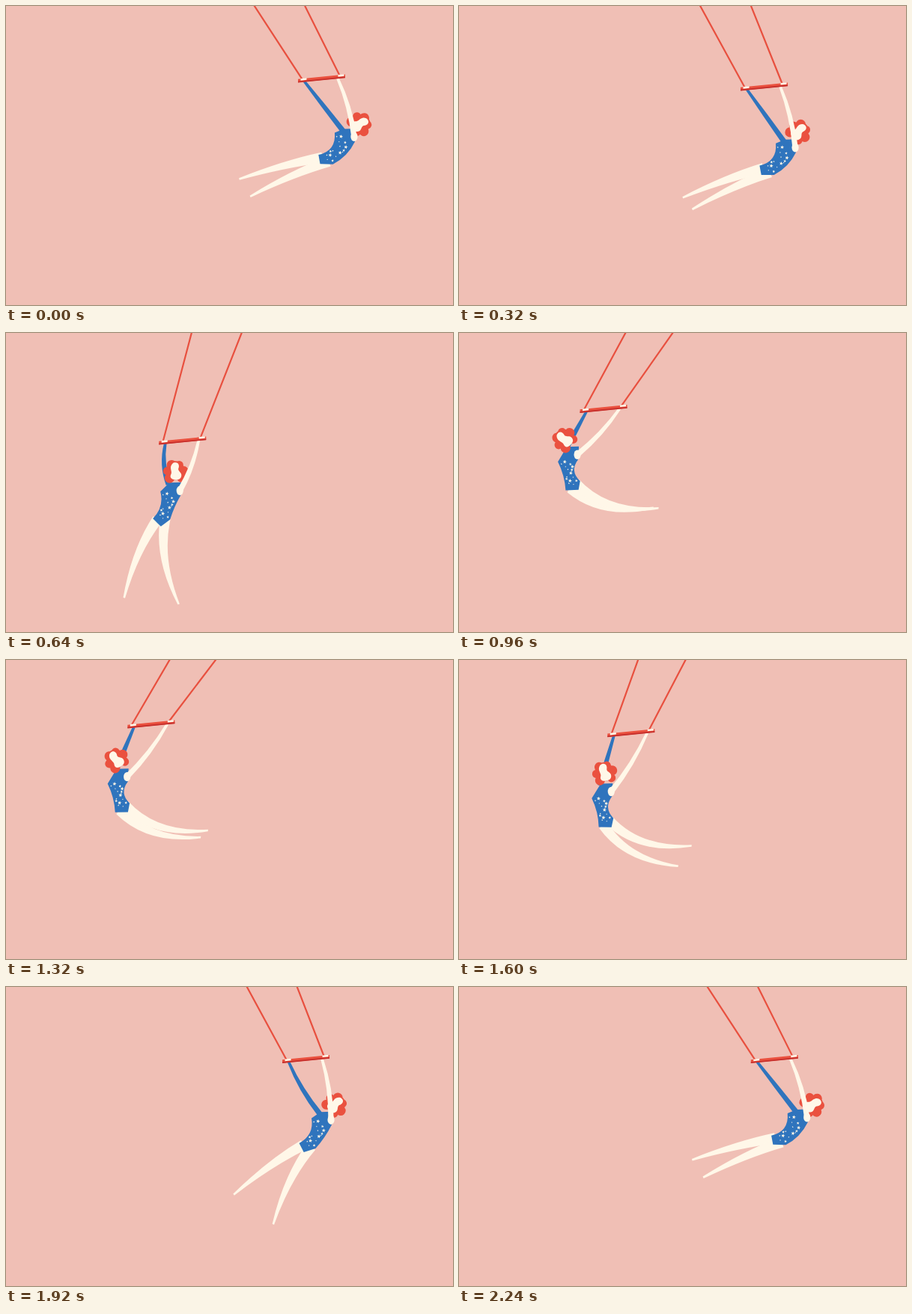
Animation of 597 by 400 pixels, one loop 2.28 s. Source, as an HTML page:

```html
<!DOCTYPE html>
<html lang="en">
<head>
<meta charset="utf-8">
<title>Trapeze</title>
<style>
  html, body { margin: 0; width: 100%; height: 100%; overflow: hidden; background: #f0bfb5; }
  svg { display: block; width: 597px; height: 400px; }
</style>
</head>
<body>
<svg viewBox="0 0 597 400">
  <path id="ropes" stroke="#e8503f" stroke-width="2.2"/>
  <path id="armL" fill="#2f74bd"/>
  <g fill="#fff7e8"><path id="legL"/><path id="legR"/></g>
  <path id="torso" fill="#2f74bd"/>
  <path id="stars" fill="#fff7e8"/>
  <g id="head">
    <path id="hair" fill="#ea513f"/>
    <path fill="#fff7e8" d="M-1-12C4-13 6-8 4-4C3 0 9 1 8 6C7 11 3 11 0 11C-5 11-8 8-6 4C-4 1-7-3-6-7C-5-10-3-12-1-12Z"/>
  </g>
  <path id="armR" fill="#fff7e8"/>
  <ellipse id="shoulder" rx="4.6" ry="6.2" fill="#fff7e8"/>
  <g id="bar">
    <path fill="#ea513f" d="M-31.5 1L31.5-5.3V-.8L-31.5 5.5Z"/>
    <path fill="#c8312d" d="M-31.5 3.8L31.5-2.5V-.6L-31.5 5.7Z"/>
    <path fill="#fff7e8" d="M-28 .3L-20-.6V2L-28 3ZM22-4.8L30-5.6V-3L22-2.2Z"/>
  </g>
</svg>
<script>
const LOOP = 2280, STEP = 40;
const PIVOT = { x: 298.5, y: -93 };
const LEG = 115, SPINE = 52;
const $ = id => document.getElementById(id);
const set = (id, d) => $(id).setAttribute('d', d);

// Key poses: time, rope reach, collar x and y from the bar, back arch (-1 to 1),
// head tilt, and the directions of both legs in degrees.
const poses = [
  [-20, 226, 37.5, 67.5, 1, 65, 165.5, 156],
  [320, 228.5, 35.5, 71, 1, 45, 160, 154.5],
  [640, 245, -9.5, 56.5, .1, 0, 113, 81],
  [960, 221, -41, 51, -1, -48, 13.5, 16.5],
  [1600, 202.5, -32.5, 68, -.95, -12, 29, 17],
  [1920, 215, 27.5, 71, .55, 50, 144.5, 116]
];

// Periodic monotone cubic through the key poses.
function poseAt(t) {
  const n = poses.length;
  const key = j => poses[(j + n) % n];
  const time = j => key(j)[0] + Math.floor(j / n) * LOOP;
  if (t >= time(n)) t -= LOOP;
  let i = n - 1;
  while (i > 0 && time(i) > t) i--;
  const span = time(i + 1) - time(i), u = (t - time(i)) / span, w = 1 - u;
  return poses[0].map((_, col) => {
    const val = j => key(j)[col];
    const slope = j => (val(j + 1) - val(j)) / (time(j + 1) - time(j));
    const tangent = j => {
      const a = slope(j - 1), b = slope(j);
      return a * b > 0 ? 2 * a * b / (a + b) : 0;
    };
    return val(i) * w * w * (1 + 2 * u) + val(i + 1) * u * u * (3 - 2 * u)
      + span * u * w * (tangent(i) * w - tangent(i + 1) * u);
  });
}

// Sharpened cosine: 1 at the right end, -1 at the left end.
function swing(t) {
  const turn = (start, length) => Math.PI * Math.min(1, Math.max(0, (t - start) / length));
  const c = t < 1100 ? Math.cos(turn(0, 1060)) : -Math.cos(turn(1165, 1135));
  return Math.tanh(2.2 * c) / Math.tanh(2.2);
}

const mix = (a, b, k) => a.map((v, i) => v + (b[i] - v) * k);
const add = (p, x, y) => [p[0] + x, p[1] + y];
const polar = (p, deg, r) => add(p, r * Math.cos(deg * Math.PI / 180), r * Math.sin(deg * Math.PI / 180));
const heading = (a, b) => Math.atan2(b[1] - a[1], b[0] - a[0]) * 180 / Math.PI;
const str = p => p.map(v => v.toFixed(2)).join(' ');

// Point beside the line a-b, bow px to its right-hand side.
const beside = (a, b, bow, k = .5) => polar(mix(a, b, k), heading(a, b) + 90, bow);
// Quadratic from a to b that passes through m halfway.
const via = (a, m, b) => `Q${str(m.map((v, i) => 2 * v - (a[i] + b[i]) / 2))} ${str(b)}`;

// Curved limb with half-widths at root, middle and end.
function limb(root, end, bow, widths, k = .5) {
  const mid = beside(root, end, bow, k);
  const dirs = [heading(root, mid), heading(root, end), heading(mid, end)];
  const edge = side => [root, mid, end].map((p, i) => polar(p, dirs[i] + 90 * side, widths[i]));
  const [a, b, c] = edge(1), [d, e, f] = edge(-1);
  return `M${str(a)}${via(a, b, c)}L${str(f)}${via(f, e, d)}Z`;
}

function leg(root, deg) {
  const bow = 2 + 6 * (1 + Math.cos(deg * Math.PI / 180));
  return limb(root, polar(root, deg, LEG), bow, [7, 4.6, 1.3], .47);
}

const circle = (x, y, r) => `M${x - r} ${y}a${r} ${r} 0 1 0 ${2 * r} 0a${r} ${r} 0 1 0 ${-2 * r} 0Z`;

function star(p, r) {
  const tips = Array.from({ length: 10 }, (_, i) => str(polar(p, i * 36 - 80, i % 2 ? r * .42 : r)));
  return `M${tips.join('L')}Z`;
}

// Curls all round the head, open at the neck.
let curls = circle(0, -1.5, 12.5);
for (let i = 0; i < 6; i++) {
  const [x, y] = polar([0, 1], 135 + i * 54, 11);
  curls += circle(x, y, i % 2 ? 5.6 : 6.6);
}
set('hair', curls);

const noise = n => {
  const v = Math.sin(n * 12.99) * 43758.5;
  return v - Math.floor(v);
};

function draw(t) {
  const [, reach, dx, dy, arch, tilt, legL, legR] = poseAt(t);
  const x = 307 + 114.5 * swing(t);
  const bar = [x, PIVOT.y + Math.sqrt(reach ** 2 - (x - PIVOT.x) ** 2)];
  set('ropes', `M272-92L${str(add(bar, -26, 1))}M352-95L${str(add(bar, 24, -4))}`);
  $('bar').setAttribute('transform', `translate(${str(bar)})`);

  const collar = add(bar, dx, dy);
  const pelvis = polar(collar, 109 + 19 * arch, SPINE);
  const hipLine = 33 * arch;
  const hip = polar(pelvis, hipLine, 11.5), thigh = polar(pelvis, hipLine, -11.5);
  const crotch = polar(polar(pelvis, hipLine + 90, 5), (legL + legR) / 2, 5);
  const chest = add(collar, -20, 12.5 - 7.5 * arch);
  const armpit = add(collar, 7, 17);
  const back = beside(armpit, hip, 1.5 - 5 * arch);
  const waist = beside(thigh, chest, 5 + 3 * arch);

  set('legL', leg(polar(pelvis, hipLine, -5), legL));
  set('legR', leg(polar(pelvis, hipLine, 5), legR));
  set('torso', `M${[chest, add(collar, -8, 0), add(collar, 8, -.5), armpit].map(str).join('L')}`
    + `${via(armpit, back, hip)}L${str(crotch)}L${str(thigh)}${via(thigh, waist, chest)}Z`);

  const shoulder = add(collar, 6, 10.5);
  set('armL', limb(add(collar, -9, 2.5), add(bar, -23, 4), -4 * (1 - arch ** 2), [3.6, 2.9, 1.8]));
  set('armR', limb(shoulder, add(bar, 21.5, 0), 3, [3.7, 2.9, 1.8]));
  $('shoulder').setAttribute('cx', shoulder[0]);
  $('shoulder').setAttribute('cy', shoulder[1]);

  const down = (a, m, c, v) => v < .5 ? mix(a, m, v * 2) : mix(m, c, v * 2 - 1);
  let d = '';
  for (let i = 0; i < 16; i++) {
    const v = (i + .5) / 16, u = .12 + .76 * noise(i + 3);
    d += star(mix(down(chest, waist, thigh, v), down(armpit, back, hip, v), u), [2.7, 1.2, 2, 1][i % 4]);
  }
  set('stars', d);

  const head = polar(collar, tilt - 90, 15);
  $('head').setAttribute('transform', `translate(${str(head)}) rotate(${tilt.toFixed(2)})`);
}

function tick(now) {
  draw(Math.floor(now % LOOP / STEP) * STEP);
  requestAnimationFrame(tick);
}
draw(0);
requestAnimationFrame(tick);
</script>
</body>
</html>
```
